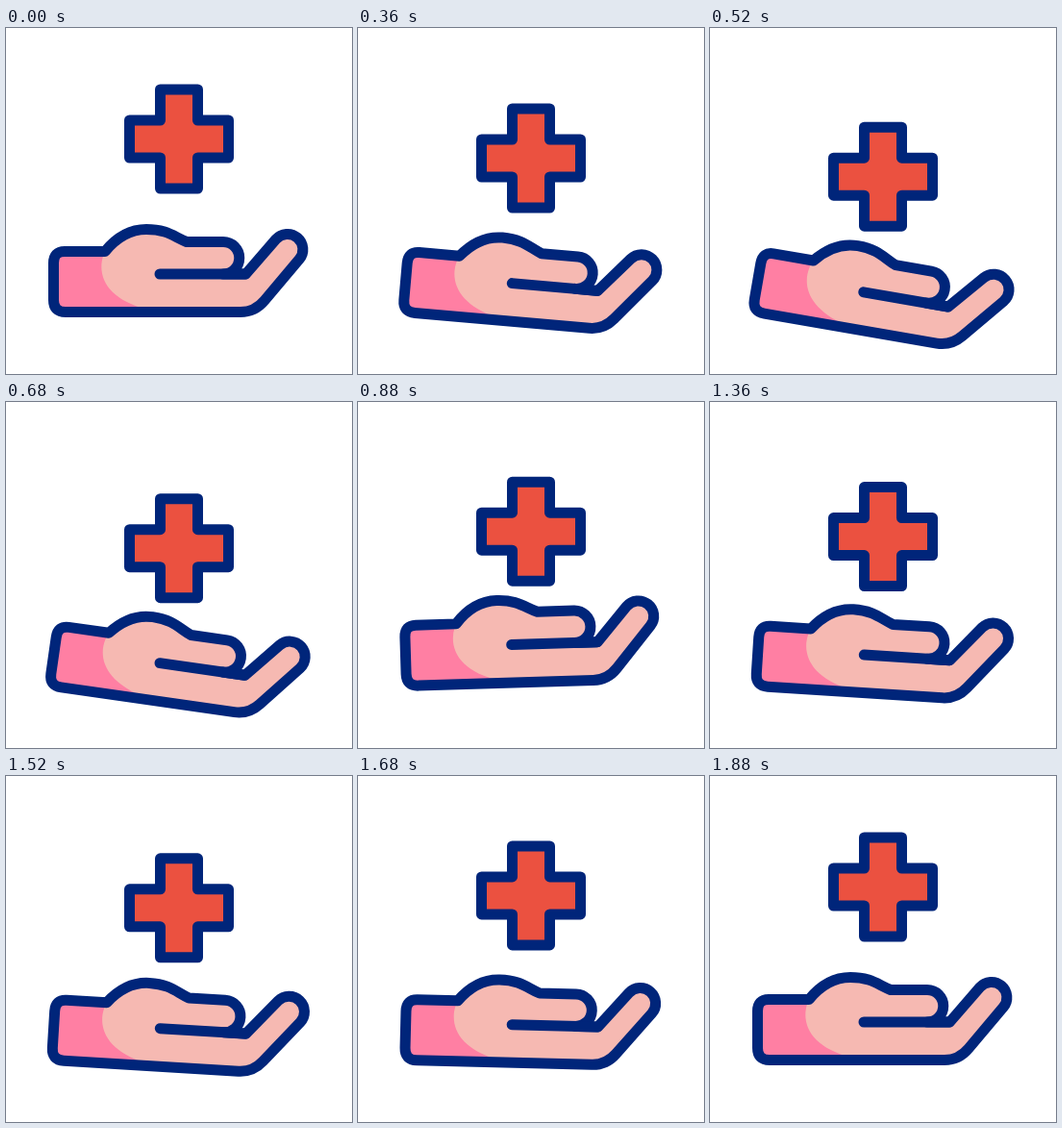
An HTML page for the animation above (2000 ms loop, 360 px wide and 360 px high).

```html
<!DOCTYPE html>
<html lang="en">
<head>
<meta charset="utf-8">
<title>Caring hand</title>
<style>
  html, body { margin: 0; width: 100%; height: 100%; overflow: hidden; background: #fff; }
  svg { display: block; width: 100vw; height: 100vh; }
  .line { fill: none; stroke: #00257a; stroke-width: 11; stroke-linecap: round; stroke-linejoin: round; }
</style>
</head>
<body>
<svg viewBox="0 0 360 360">
  <defs>
    <path id="outline" d="M49.5 244.5Q49.5 232.5 61 232.5H103C114 219 127 209.5 146 209.5C168 209.5 175 217.5 188 222.5H226A16.75 16.75 0 0 1 226 256H249.5L280.8 219.9A16 16 0 0 1 305.2 240.6L269 283.5Q259 295.5 244 295.5H62Q49.5 295.5 49.5 283Z"/>
    <clipPath id="inside"><use href="#outline"/></clipPath>
  </defs>
  <g id="hand">
    <use href="#outline" fill="#f6b9b2"/>
    <path clip-path="url(#inside)" fill="#ff7fa3" d="M40 225H107C91 249 98 281 148 293V305H40Z"/>
    <use href="#outline" class="line"/>
    <path class="line" d="M160 256H249"/>
  </g>
  <g id="cross">
    <path class="line" style="fill:#eb5140" d="M160.5 64H199.5V96H231.5V135H199.5V167H160.5V135H128.5V96H160.5Z"/>
  </g>
</svg>
<script>
const LOOP = 2000;
const hand = document.getElementById('hand');
const cross = document.getElementById('cross');

// time in ms, hand angle in degrees, cross drop in px
const keys = [
  [160, 0, 0],
  [560, 10, 40],
  [1080, -7, 10],
  [1400, 4, 25],
  [1880, 0, 0]
];

// cubic-bezier(.42, 0, .58, 1)
function ease(x) {
  let lo = 0, hi = 1;
  for (let i = 0; i < 24; i++) {
    const s = (lo + hi) / 2, r = 1 - s;
    const bx = 3 * r * r * s * 0.42 + 3 * r * s * s * 0.58 + s * s * s;
    if (bx < x) lo = s; else hi = s;
  }
  return lo * lo * (3 - 2 * lo);
}

function pose(t) {
  const next = keys.findIndex(k => t < k[0]);
  if (next < 1) return [0, 0];
  const a = keys[next - 1], b = keys[next];
  const p = ease((t - a[0]) / (b[0] - a[0]));
  return [1, 2].map(i => a[i] + (b[i] - a[i]) * p);
}

function draw(t) {
  const [angle, drop] = pose(t % LOOP);
  hand.setAttribute('transform', `rotate(${angle} 50 264)`);
  cross.setAttribute('transform', `translate(0 ${drop})`);
}

let start;
function tick(now) {
  start ??= now;
  draw(now - start);
  requestAnimationFrame(tick);
}
draw(0);
requestAnimationFrame(tick);
</script>
</body>
</html>
```
